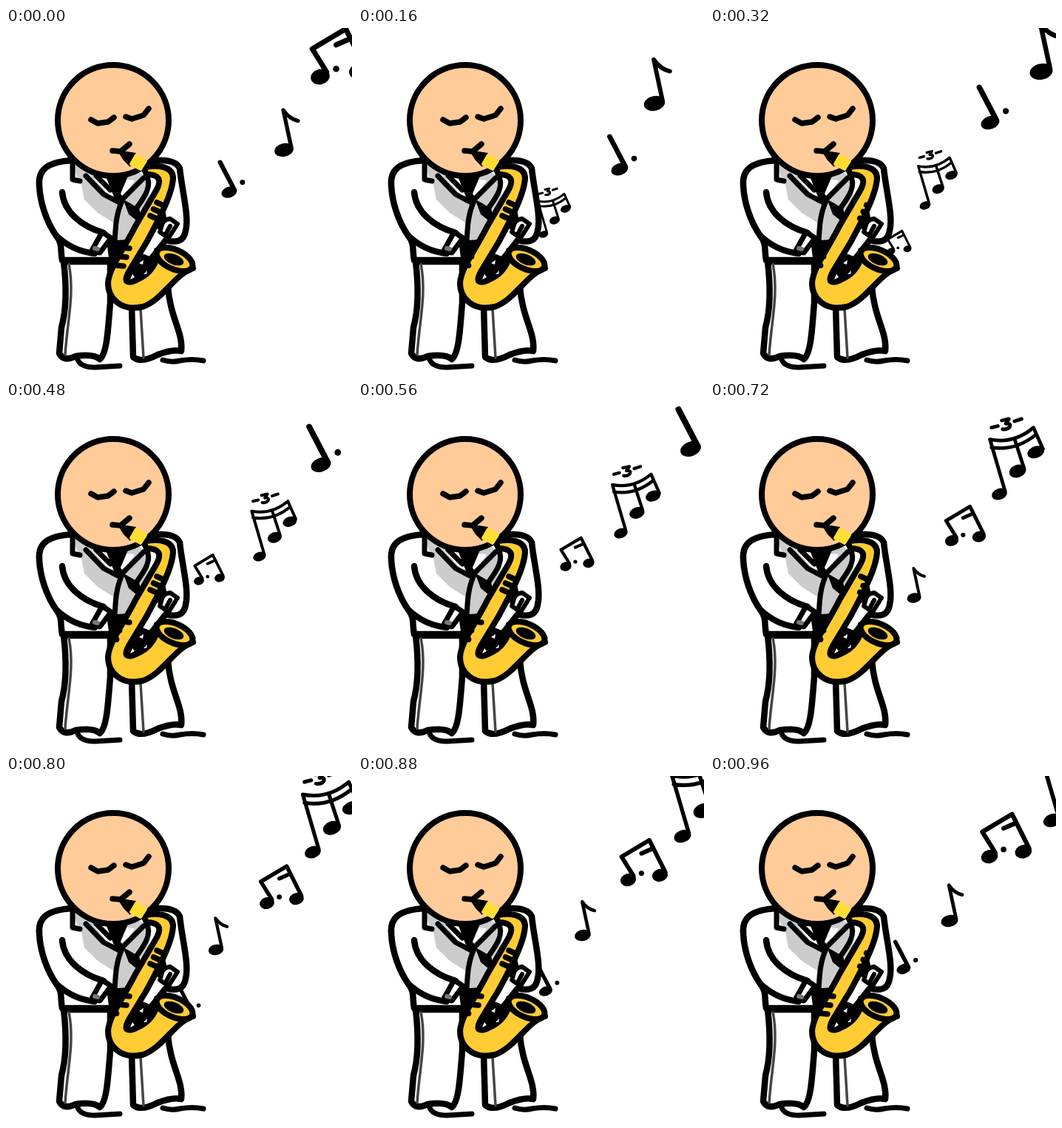
An HTML page that plays this animation: 468x468 px, repeating every 1040 ms.

```html
<!DOCTYPE html>
<html lang="en">
<head>
<meta charset="utf-8">
<title>Saxophone player</title>
<style>
html, body { margin: 0; height: 100%; overflow: hidden; background: #fff; }
svg { display: block; width: 100%; height: 100%; }
.ink { fill: none; stroke: #000; stroke-linecap: round; stroke-linejoin: round; }
.white { fill: #fff; }
.gold { fill: #fc3; }
.solid { fill: #000; stroke: none; }
.seam { stroke: #444; stroke-width: 3.5; }
</style>
</head>
<body>
<svg viewBox="0 0 468 468">
  <g id="dotted" class="ink" stroke-width="8">
    <path d="M-16-52L8-6"/>
    <ellipse class="solid" rx="14" ry="9.5" transform="rotate(-20)"/>
    <circle class="solid" cx="23" cy="-17" r="4.5"/>
  </g>
  <g id="flagged" class="ink" stroke-width="6">
    <path d="M11-4L-1-60Q8-47 21-44"/>
    <ellipse class="solid" rx="14.5" ry="10" transform="rotate(-12)"/>
  </g>
  <g id="pair" class="ink" stroke-width="6.5">
    <path d="M8-6L-10-35L32-60L56-12M36-47L20-40"/>
    <ellipse class="solid" rx="12" ry="9.5" transform="rotate(-15)"/>
    <ellipse class="solid" rx="12" ry="9.5" transform="translate(48-7)rotate(-15)"/>
    <circle class="solid" cx="20" cy="-10" r="4"/>
  </g>
  <g id="triplet" class="ink" stroke-width="4.5">
    <path d="M7-4L-12-69Q18-63 43-84L55-57M-10-59Q20-54 46-75M19-70L31-33"/>
    <path d="M3-93L12-95L8-89Q15-90 13-85Q10-81 4-82M-10-84L-2-86M19-92L28-95"/>
    <ellipse class="solid" rx="10" ry="7" transform="rotate(-20)"/>
    <ellipse class="solid" rx="11" ry="8" transform="translate(23-29)rotate(-20)"/>
    <ellipse class="solid" rx="11" ry="7.5" transform="translate(46-53)rotate(-20)"/>
  </g>

  <g class="ink" stroke-width="8.5">
    <!-- trousers and shoes -->
    <path class="white" d="M78 316C82 350 82 380 75 405L72 440Q78 452 94 444Q118 440 127 448C137 440 138 405 141 372V316Z"/>
    <path class="white" d="M170 376L172 445Q182 454 205 442Q225 434 237 437C240 412 222 392 219 350Z"/>
    <path class="seam" d="M85 319C93 360 83 395 80 442M182 380L186 446"/>
    <path stroke-width="7" d="M97 449Q102 459 120 459L154 457M212 449Q224 453 235 450Q252 447 267 450"/>
    <!-- jacket -->
    <path class="white" d="M90 179C58 181 43 190 45 213C46 236 55 263 68 281C77 292 73 300 76 314H195L216 287Q240 294 243 274C248 255 238 220 235 190Q230 178 205 179Z"/>
    <path fill="#ccc" stroke="none" d="M88 184L102 212L106 232L124 250L146 264L145 292L172 300L190 250L196 206L178 194Z"/>
    <path class="white" stroke="none" d="M118 202L146 234L154 236L174 206Z"/>
    <path stroke-width="7" d="M90 180V205L100 207M108 200L132 225L153 236L186 203M122 200L141 219"/>
    <path stroke-width="7" d="M190 200C198 214 187 229 177 243M157 234C148 253 148 274 147 290"/>
    <path class="solid" d="M134 198H166L155 224L161 233L180 244L186 268L166 252L160 236L150 238L145 226Z"/>
    <!-- arms -->
    <path d="M76 222C78 248 101 268 132 277M68 281C82 294 100 303 120 305"/>
    <path class="white" stroke-width="7" d="M130 276L116 301L127 304L142 284Z"/>
    <path stroke="#777" stroke-width="6" d="M120 298L124 299"/>
    <path class="white" stroke-width="6" d="M213 260L222 258L232 265L220 284L208 276ZM222 268L216 279"/>
    <path class="solid" d="M200 232L214 240L218 262L206 272L190 268Z"/>
    <path class="solid" d="M136 288L166 286L172 300L202 312L204 328L178 346L160 344L166 316L140 318Z"/>
  </g>

  <circle class="ink" cx="145" cy="125" r="75" stroke-width="8" style="fill:#ffcb99"/>
  <path class="ink" stroke-width="7.5" d="M115 124L124 129L138 127L146 121M162 120L170 123L186 118L193 109M144 166L155 167L167 157M155 167L163 173"/>

  <!-- saxophone -->
  <g class="ink" stroke-width="8">
    <path class="gold" d="M186 189C204 184 226 187 226 203C225 226 205 262 190 290L167 328C157 345 165 346 176 341C196 333 206 316 204 301L250 315L253 325C228 333 212 368 185 377C155 384 138 365 138 345C139 325 160 298 175 268L203 220C211 206 208 198 190 198Z"/>
    <ellipse class="gold" cx="228" cy="313" rx="26" ry="13" transform="rotate(24 228 313)"/>
    <ellipse class="solid" cx="227" cy="313" rx="14" ry="7" transform="rotate(22 227 313)"/>
    <path class="white" stroke="none" d="M168 340L171 333L174 337ZM180 318L186 314L185 320ZM186 333L191 328L190 333Z"/>
    <path class="solid" d="M150 165L176 169L168 188L159 179Z"/>
    <path fill="#fd3" stroke="#fd3" stroke-width="4" d="M176 172L189 180L182 191L169 184Z"/>
  </g>
  <path id="fingers" class="ink" stroke-width="7.5"/>
</svg>
<script>
const STEP = 80, COUNT = 13;

// Every note follows this path from its own starting point: one bend per two ticks.
const path = [[0, 0], [16, -60], [56, -99], [108, -130], [133, -193], [180, -236], [228, -279]];
const notes = [
  { id: "dotted", born: 10, x: 246, y: 321, size: .63, grow: .036 },
  { id: "flagged", born: 8, x: 268, y: 295, size: .62, grow: .046 },
  { id: "pair", born: 4, x: 245, y: 302, size: .46, grow: .062, life: 10 },
  { id: "triplet", born: 0, x: 235, y: 339, size: .53, grow: .06 }
];

// Each hand has three fingers in a row; pressed counts those held down, changing every second step.
const hands = [
  { x: 213, y: 240, rowX: -4.5, rowY: 9, dx: -9, dy: -4, pressed: "3303130" },
  { x: 156, y: 297, rowX: -4, rowY: 12, dx: 11, dy: 1, pressed: "3001023" }
];

const byId = id => document.getElementById(id);
const mix = (a, b, k) => a + (b - a) * k;

function placeNote({ id, born, x, y, size, grow, life = 12 }, tick) {
  const age = tick < born ? tick + COUNT + 1 - born : tick - born;
  const el = byId(id);
  el.style.display = age > life ? "none" : "";
  if (age > life) return;
  const i = Math.floor(age / 2), k = age / 2 - i;
  const a = path[i], b = path[i + 1] || a;
  el.setAttribute("transform",
    `translate(${x + mix(a[0], b[0], k)} ${y + mix(a[1], b[1], k)}) scale(${size + grow * age})`);
}

function fingerPath(step) {
  let d = "";
  for (const h of hands) {
    for (let i = 0; i < 3; i++) {
      const reach = i < h.pressed[step >> 1] ? 1 : .15;
      d += `M${h.x + h.rowX * i} ${h.y + h.rowY * i}l${h.dx * reach} ${h.dy * reach}`;
    }
  }
  return d;
}

function draw(now) {
  const step = Math.floor(now / STEP) % COUNT;
  // the wrap to the first step moves the notes on by two ticks
  const tick = step || COUNT + 1;
  notes.forEach(n => placeNote(n, tick));
  byId("fingers").setAttribute("d", fingerPath(step));
}

const start = performance.now();
function loop() {
  draw(performance.now() - start);
  requestAnimationFrame(loop);
}
loop();
</script>
</body>
</html>
```
